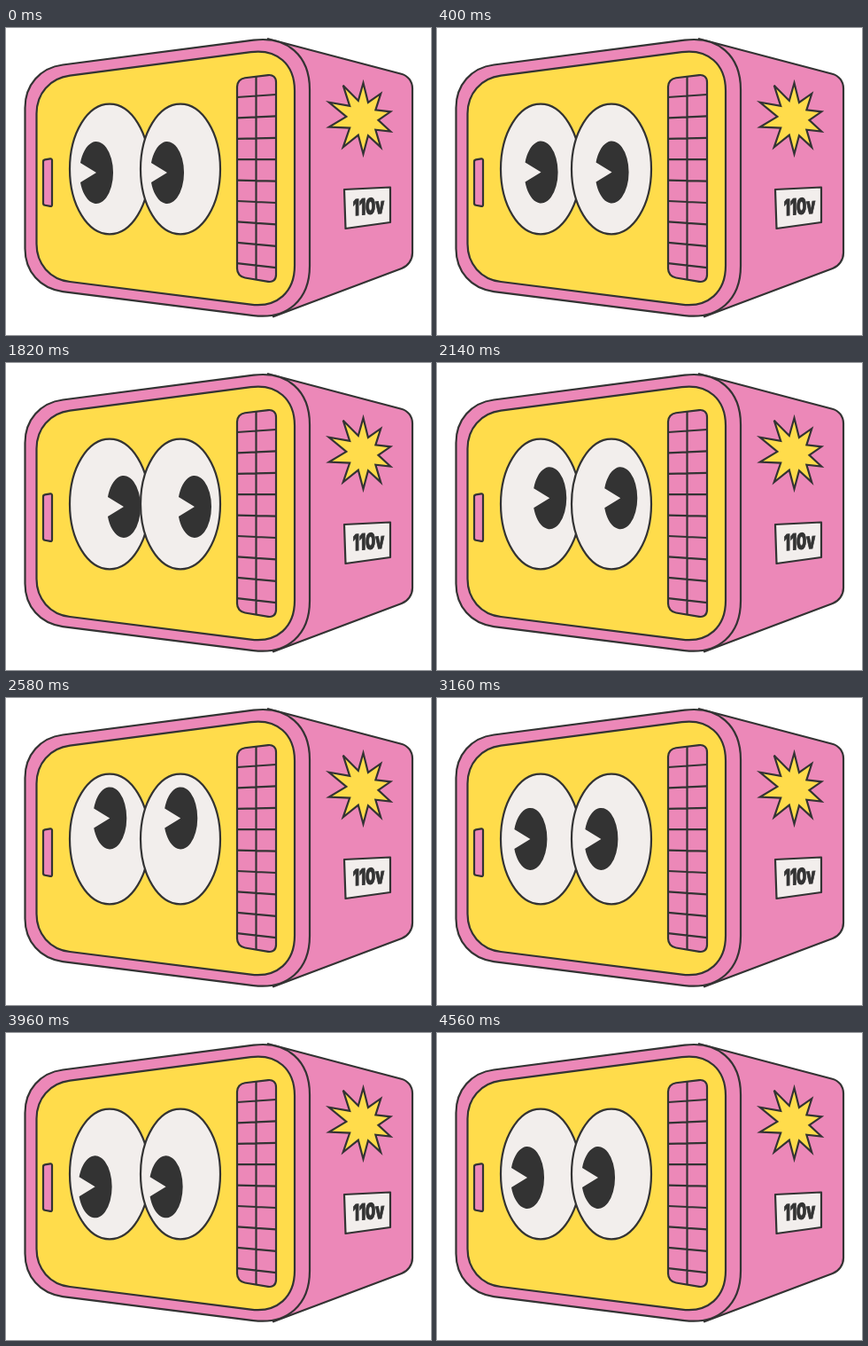
Write an HTML page that moves like this. It is 480 px wide and 346 px high and loops after 4800 ms.

```html
<!DOCTYPE html>
<html lang="en">
<head>
<meta charset="utf-8">
<title>Looking around</title>
<style>
  html, body { margin: 0; width: 100%; height: 100%; overflow: hidden; background: #fff; }
  svg { display: block; width: 480px; height: 346px; }
  .line { stroke: #333; stroke-width: 2.2; stroke-linejoin: round; fill: none; }
  .pink { fill: #ec88b8; }
  .yellow { fill: #ffdc4b; }
  .white { fill: #f2eeec; }
  .dark { fill: #333; }
  .sharp { stroke-linejoin: miter; }
  text { font: 900 25px Inter, Roboto, sans-serif; text-anchor: middle; fill: #333; stroke: #333; stroke-width: 1; }
</style>
</head>
<body>
<svg id="stage" viewBox="0 0 480 346"></svg>
<script>
  const stage = document.getElementById("stage");
  const LOOP = 4800;
  const EYE_GAP = 80;

  // where the gaze travels, and how far it swings sideways on the way
  const GLANCES = [
    { from: 0, to: 800, x: 31, y: -1, swing: 0 },
    { from: 1800, to: 2640, x: 15, y: -28, swing: 0 },
    { from: 2640, to: 3610, x: -2, y: 15, swing: -20 },
    { from: 3610, to: 4560, x: 0, y: 0, swing: 0 }
  ];

  function add(tag, className, attrs) {
    const node = document.createElementNS("http://www.w3.org/2000/svg", tag);
    node.setAttribute("class", className);
    for (const key in attrs) node.setAttribute(key, attrs[key]);
    return stage.appendChild(node);
  }

  const path = (className, d) => add("path", className, { d });
  const mix = (a, b, k) => a + (b - a) * k;

  // a point at the given distance from one corner towards another
  function towards([x, y], [tx, ty], distance) {
    const k = distance / Math.hypot(tx - x, ty - y);
    return [mix(x, tx, k), mix(y, ty, k)];
  }

  // closed outline through corners [x, y, radius]
  function rounded(...corners) {
    const n = corners.length;
    const parts = corners.map((c, i) => {
      const before = corners[(i + n - 1) % n];
      const after = corners[(i + 1) % n];
      const r = c[2] || 0;
      return `${towards(c, before, r)}C${towards(c, before, r * .4)} ` +
             `${towards(c, after, r * .4)} ${towards(c, after, r)}`;
    });
    return "M" + parts.join("L") + "Z";
  }

  // burst on the receding side, narrower towards the back
  function star(cx, cy, spikes) {
    const points = [];
    for (let i = 0; i < spikes * 2; i++) {
      const angle = i * Math.PI / spikes;
      const k = i % 2 ? .5 : 1;
      const u = k * Math.sin(angle);
      const v = -k * Math.cos(angle);
      const depth = 1 + .12 * u;
      points.push([cx + 36 * u / depth, cy + (40 * v + 4 * u) / depth]);
    }
    return "M" + points.join("L") + "Z";
  }

  function bars() {
    let d = "M282.5 54V284";
    for (let i = 0; i < 9; i++) d += `M261 ${78 + 23.4 * i}L305 ${75 + 24.4 * i}`;
    return d;
  }

  // pupil: an ellipse with a wedge cut from its left side
  function eye(dx) {
    add("ellipse", "line white", { cx: 117 + dx, cy: 159, rx: 45, ry: 73.3 });
    const pupil = path("dark", "M0 0L-18 -11A19 35 0 1 1 -18 11Z");
    return (x, y) => pupil.setAttribute("transform", `translate(${102 + dx + x} ${163 + y})`);
  }

  // side, frame, door
  path("line pink", rounded([296, 12.2], [459, 55, 13], [459, 266.5, 13], [302, 325.3]));
  path("line pink", rounded([21.5, 47, 43], [343, 5.5, 64], [343, 332, 64], [21.5, 291.7, 43]));
  path("line yellow", rounded([34.5, 58.6, 38], [326, 20.7, 50], [326, 317.8, 50], [34.5, 281.3, 38]));

  // handle and vent
  path("line pink", rounded([42, 148.7, 2], [52, 147.1, 2], [52, 201.2, 2], [42, 199.4, 2]));
  path("line pink", rounded([261, 57.3, 9], [305, 52, 9], [305, 287.3, 9], [261, 280, 9]));
  path("line", bars());

  // burst and label
  path("line yellow sharp", star(403.5, 102, 10));
  path("line white", rounded([382, 182], [434, 179.5], [434, 219], [383.5, 226]));
  add("text", "", { transform: "matrix(.63 -.05 0 1 409.5 210)" }).textContent = "110v";

  const eyes = [eye(0), eye(EYE_GAP)];

  const ease = u => u * u * (3 - 2 * u);

  function gaze(t) {
    let x = 0, y = 0;
    for (const g of GLANCES) {
      if (t < g.from) break;
      const s = ease(Math.min(1, (t - g.from) / (g.to - g.from)));
      x = mix(x, g.x, s) + g.swing * s * (1 - s) ** 2;
      y = mix(y, g.y, s);
    }
    return [x, y];
  }

  const began = performance.now();
  function draw() {
    const [x, y] = gaze((performance.now() - began) % LOOP);
    eyes.forEach(look => look(x, y));
    requestAnimationFrame(draw);
  }
  draw();
</script>
</body>
</html>
```
